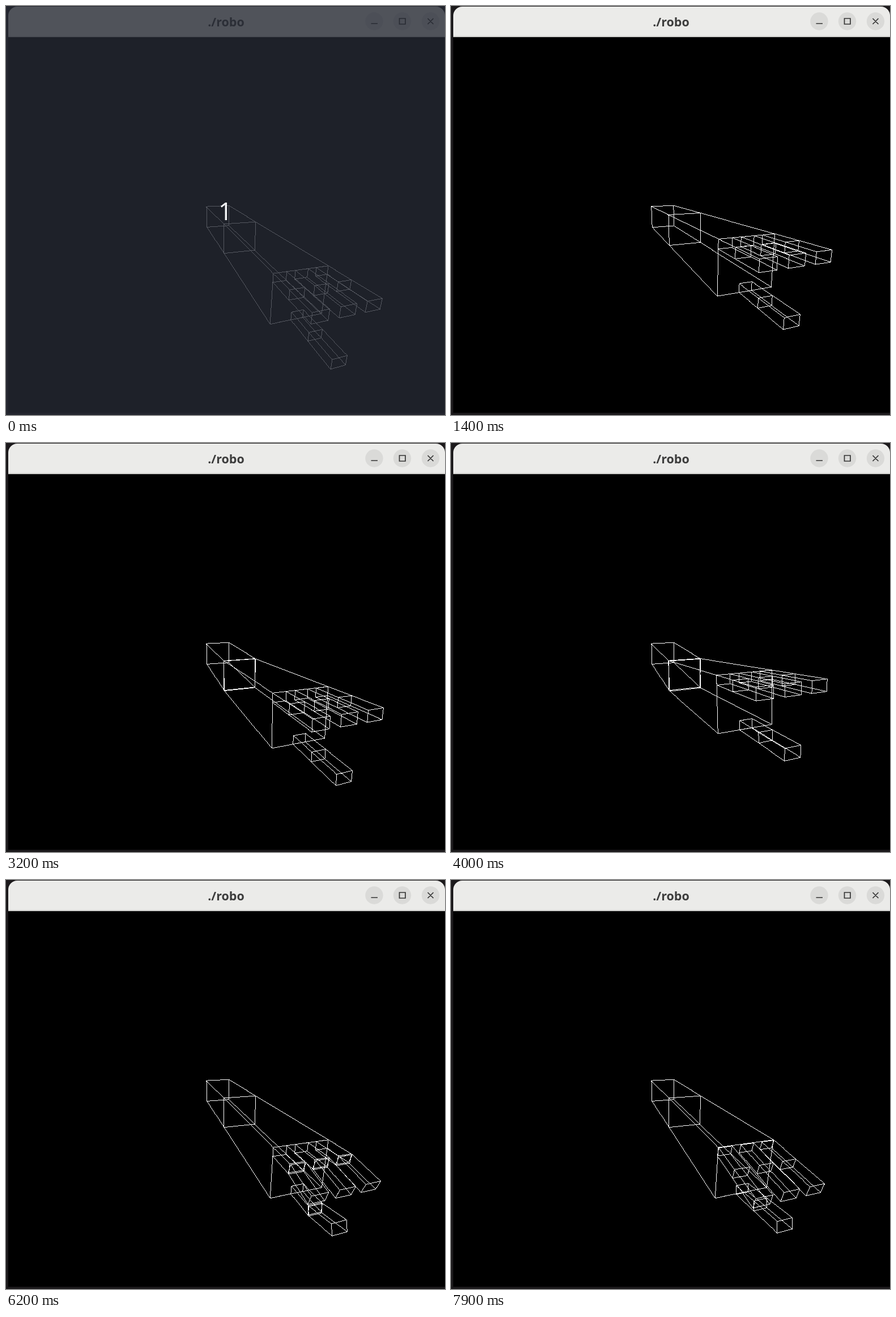
Recreate the animation shown at these times as an HTML page with a canvas. Size 775 by 722 pixels, loop 8000 ms.

```html
<!DOCTYPE html>
<html>
<head>
<meta charset="utf-8">
<style>
  html, body { margin: 0; width: 775px; height: 722px; overflow: hidden; background: #1b191b; }
  canvas { display: block; }
</style>
</head>
<body>
<canvas id="stage" width="775" height="722"></canvas>
<script>
const ctx = document.getElementById('stage').getContext('2d');
const rad = deg => deg * Math.PI / 180;
const LOOP = 8000;

// Key presses: each one turns a joint by 5 degrees.
const KEYS = [
  ['shoulder', 1, [1400, 1600, 1800]], ['shoulder', -1, [2400, 2600, 2800]],
  ['elbow', 1, [3200, 3400, 3600]], ['elbow', -1, [4000, 4300, 4500]],
  ['tip', 1, [5700, 5900, 6200]], ['tip', -1, [6700, 6900, 7100]],
  ['knuckle', 1, [7600, 7900]]
];

function poseAt(t) {
  const pose = { shoulder: 0, elbow: 0, tip: 0, knuckle: 0 };
  for (const [joint, dir, times] of KEYS)
    pose[joint] += 5 * dir * times.filter(time => time <= t).length;
  return pose;
}

// Camera: orbiting the origin, 85 degree field of view.
const YAW = rad(15), PITCH = rad(15), DISTANCE = 5;
const CX = 389.9, CY = 386.6, FOCAL = 332 / Math.tan(rad(42.5));

// x runs along the arm, y up, w across it to the right.
function project(x, y, w) {
  const right = x * Math.sin(YAW) + w * Math.cos(YAW);
  const ahead = w * Math.sin(YAW) - x * Math.cos(YAW);
  const down = -ahead * Math.sin(PITCH) - y * Math.cos(PITCH);
  const depth = DISTANCE + ahead * Math.cos(PITCH) - y * Math.sin(PITCH);
  return [CX + FOCAL * right / depth, CY + FOCAL * down / depth];
}

// Hard-edged one pixel line.
function line([x0, y0], [x1, y1]) {
  const n = Math.ceil(Math.max(Math.abs(x1 - x0), Math.abs(y1 - y0), 1));
  for (let i = 0; i <= n; i++)
    ctx.fillRect(Math.floor(x0 + (x1 - x0) * i / n), Math.floor(y0 + (y1 - y0) * i / n), 1, 1);
}

// A joint frame is {x, y, angle} in the plane of the arm.
function move({ x, y, angle }, along, up, turn = 0) {
  const c = Math.cos(rad(angle)), s = Math.sin(rad(angle));
  return { x: x + along * c - up * s, y: y + along * s + up * c, angle: angle + turn };
}

// Wire box that starts at a joint; returns the joint at its far end.
function box(joint, length, height, width, w = 0) {
  const corner = i => {
    const p = move(joint, i & 1 ? length : 0, (i & 2 ? 0.5 : -0.5) * height);
    return project(p.x, p.y, w + (i & 4 ? 0.5 : -0.5) * width);
  };
  for (let i = 0; i < 8; i++)
    for (const bit of [1, 2, 4])
      if (!(i & bit)) line(corner(i), corner(i | bit));
  return move(joint, length, 0);
}

function finger(wrist, up, w, knuckle, tip) {
  const joint = box(move(wrist, 0, up, knuckle), 0.3, 0.1, 0.15, w);
  box(move(joint, 0, 0, tip), 0.3, 0.1, 0.15, w);
}

function arm({ shoulder, elbow, tip, knuckle }) {
  ctx.fillStyle = '#fff';
  const joint = box({ x: -1, y: 0, angle: shoulder }, 2, 0.6, 0.65);
  const wrist = box(move(joint, 0, 0, elbow), 2, 0.6, 0.65);
  for (const w of [-0.25, 0, 0.25]) finger(wrist, 0.25, w, -knuckle, -tip);
  finger(wrist, -0.25, 0, knuckle, tip);
}

function text(string, x, y, font, align, color) {
  ctx.font = font + ' "Open Sans", "Noto Sans", sans-serif';
  ctx.textAlign = align;
  ctx.fillStyle = color;
  ctx.fillText(string, x, y);
}

function chrome() {
  ctx.fillStyle = '#1b191b';
  ctx.fillRect(0, 0, 775, 722);
  ctx.fillStyle = '#ebebe9';
  ctx.beginPath();
  ctx.roundRect(4, 1, 771, 60, [16, 16, 0, 0]);
  ctx.fill();
  ctx.fillStyle = '#cfcfcc';
  ctx.fillRect(4, 53, 771, 2);
  ctx.fillStyle = '#000';
  ctx.fillRect(4, 55, 771, 663);
  text('./robo', 388.5, 36, 'bold 21.5px', 'center', '#3d3d3d');

  ctx.fillStyle = '#dadad8';
  for (const x of [650, 699.5, 749.5]) {
    ctx.beginPath();
    ctx.arc(x, 27, 15.7, 0, 2 * Math.PI);
    ctx.fill();
  }
  ctx.strokeStyle = '#333';
  ctx.lineWidth = 1.7;
  ctx.stroke(new Path2D('M644.5 31H656M694.5 22H705V32H694.5ZM744.5 22L754.5 32M754.5 22L744.5 32'));
}

function draw() {
  const t = performance.now() % LOOP;
  chrome();
  arm(poseAt(t));
  if (t < 100) {
    ctx.fillStyle = 'rgba(39, 43, 52, 0.79)';
    ctx.fillRect(0, 0, 775, 722);
    text('1', 375, 378, '43px', 'left', '#f4f5f7');
  }
  requestAnimationFrame(draw);
}
draw();
</script>
</body>
</html>
```
